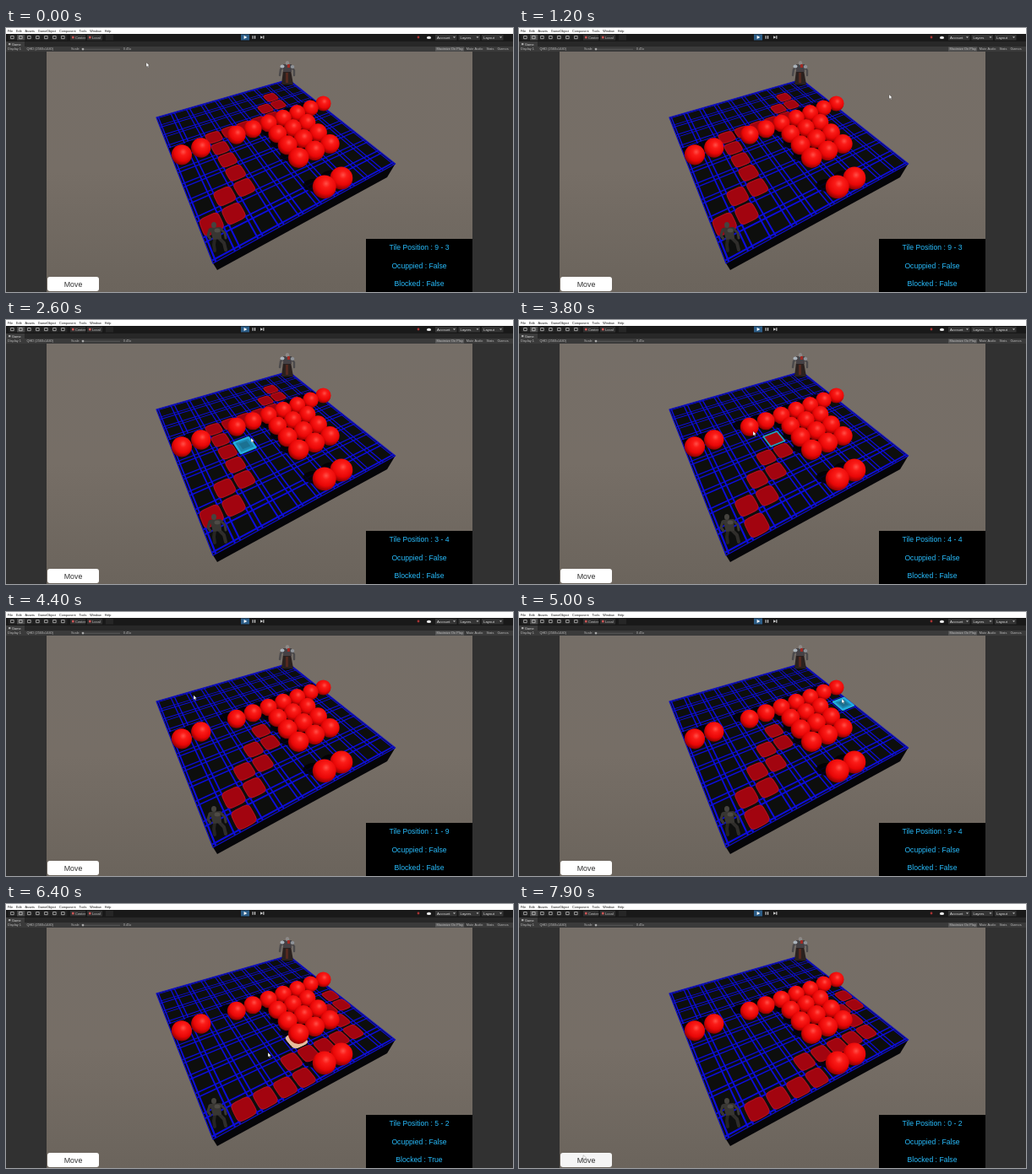
Write an HTML page with a canvas that moves like this. It is 600 by 313 pixels and loops after 8 s.

```html
<!DOCTYPE html>
<html lang="en">
<head>
<meta charset="utf-8">
<title>Grid pathfinding</title>
<style>
html, body { margin: 0; width: 100%; height: 100%; overflow: hidden; background: #313131; }
canvas { display: block; }
</style>
</head>
<body>
<canvas id="stage" width="600" height="313"></canvas>
<script>
const ctx = document.getElementById('stage').getContext('2d');
const FONT = '"Liberation Sans", Arial, sans-serif';
const LOOP = 8000, STEP = 100, SIZE = 10;

// Board cells to screen: a projective map, and its inverse.
const M = { x: 245, y: 279, xu: 40.5, xv: 5.93, yu: -5.18, yv: -9.78, wu: 0.0411, wv: 0.071 };

function project(u, v) {
  const w = 1 + M.wu * u + M.wv * v;
  return [(M.x + M.xu * u + M.xv * v) / w, (M.y + M.yu * u + M.yv * v) / w];
}

function cellAt([x, y]) {
  const a = M.xu - M.wu * x, b = M.xv - M.wv * x, c = M.yu - M.wu * y, d = M.yv - M.wv * y;
  const det = a * d - b * c, dx = x - M.x, dy = y - M.y;
  const cell = [(dx * d - b * dy) / det, (a * dy - dx * c) / det].map(Math.floor);
  return cell.every(n => n >= 0 && n < SIZE) ? cell : null;
}

function isBlocked(x, y) {
  if (y === 0) return x === 5 || x === 6;
  if (y === 5) return x !== 2;
  return y > 1 && y < 5 && x > 4 && x < 8;
}

const spheres = [];
for (let row = SIZE - 1; row >= 0; row--) for (let col = 0; col < SIZE; col++) {
  if (!isBlocked(col, row)) continue;
  const [x, y] = project(col + 0.5, row + 0.5);
  const cy = y * 1.032 - 12.5;
  spheres.push({ x: x + (x - 287) * 0.042, y: cy, r: 4.7 + 0.049 * cy });
}
spheres.sort((a, b) => a.y - b.y);

// Start step and the moves made from cell 0 - 0
const routes = [[0, 'YXYXYYYYXXXXYXY'], [32, 'XYXYXYXY'], [54, 'XXXXYXXXXYYXY']];

// Pointer key points: step, x, y
const keys = [
  [0, 166, 41], [4, 141, 127], [11, 141, 127], [12, 438, 79], [14, 438, 79], [18, 398, 119],
  [22, 398, 119], [25, 287, 145], [26, 290, 140], [31, 300, 140], [37, 300, 140], [38, 277, 132],
  [43, 190, 98], [49, 382, 103], [61, 382, 103], [63, 344, 161], [67, 208, 222], [79, 76, 298]
];

const latest = (list, step) => list.filter(e => e[0] <= step).pop();

function pointer(step) {
  const a = latest(keys, step), b = keys[keys.indexOf(a) + 1] || a;
  const k = (step - a[0]) / (b[0] - a[0] || 1);
  return [a[1] + (b[1] - a[1]) * k, a[2] + (b[2] - a[2]) * k];
}

// The highlight trails the pointer by one step; the last cell stays on the panel.
function hoverAt(step) {
  const lit = step > 0 && cellAt(pointer(step - 1));
  for (let s = step - 1; s >= 0; s--) {
    const cell = cellAt(pointer(s));
    if (cell) return { cell, lit };
  }
  return { cell: [9, 3], lit: false };
}

function routeCells(step) {
  let x = 0, y = 0;
  return [...latest(routes, step)[1]].map(d => d === 'X' ? [++x, y] : [x, ++y]);
}

function rect(x, y, w, h, color) {
  ctx.fillStyle = color;
  ctx.fillRect(x, y, w, h);
}

function poly(points, fill, stroke, width = 1) {
  ctx.beginPath();
  points.forEach(p => ctx.lineTo(...p));
  ctx.closePath();
  if (fill) { ctx.fillStyle = fill; ctx.fill(); }
  if (stroke) { ctx.strokeStyle = stroke; ctx.lineWidth = width; ctx.stroke(); }
}

function limb(points, width, color) {
  ctx.beginPath();
  points.forEach(p => ctx.lineTo(...p));
  ctx.strokeStyle = color;
  ctx.lineWidth = width;
  ctx.stroke();
}

function ellipse(x, y, rx, ry, color) {
  ctx.beginPath();
  ctx.ellipse(x, y, rx, ry, 0, 0, 7);
  ctx.fillStyle = color;
  ctx.fill();
}

function text(s, x, y, size, color, align = 'left') {
  ctx.font = size + 'px ' + FONT;
  ctx.textAlign = align;
  ctx.fillStyle = color;
  ctx.fillText(s, x, y);
  return ctx.measureText(s).width;
}

function flow(words, x, y, size, color, gap) {
  for (const word of words) x += text(word, x, y, size, color) + gap;
}

const quad = (x0, y0, x1, y1) => [project(x0, y0), project(x1, y0), project(x1, y1), project(x0, y1)];

const square = (x, y, inset) => quad(x + inset, y + inset, x + 1 - inset, y + 1 - inset);

function roundSquare(x, y, half) {
  const soft = n => Math.sign(n) * Math.abs(n) ** 0.45 * half + 0.5;
  return Array.from({ length: 40 }, (_, i) => {
    const t = i * Math.PI / 20;
    return project(x + soft(Math.cos(t)), y + soft(Math.sin(t)));
  });
}

function drawEditor() {
  rect(0, 0, 600, 313, '#313131');
  rect(0, 0, 600, 7, '#fff');
  flow(['File', 'Edit', 'Assets', 'GameObject', 'Component', 'Tools', 'Window', 'Help'], 2, 4.6, 3.8, '#111', 3.9);

  rect(0, 7, 600, 9, '#191919');
  for (let x = 3; x < 70; x += 10) {
    rect(x, 8, 9.4, 6.5, x === 13 ? '#4a4a4a' : '#242424');
    ctx.strokeStyle = '#ccc';
    ctx.lineWidth = 0.7;
    ctx.strokeRect(x + 3, 9.5, 3.2, 3.2);
  }
  ['Center', 'Local'].forEach((s, i) => {
    rect(76 + i * 20, 8, 18, 6.5, '#303030');
    rect(78 + i * 20, 9.8, 2.6, 2.6, '#c55');
    text(s, 82 + i * 20, 12.6, 4, '#ccc');
  });
  rect(118, 8, 9, 6.5, '#262626');
  rect(278, 7.5, 10, 7, '#2c5d87');
  poly([[281.6, 9], [285.4, 11], [281.6, 13]], '#fff');
  for (const x of [291.6, 294, 304.3]) rect(x, 9.2, 1.1, 3.6, '#ddd');
  poly([[301.2, 9.2], [304, 11], [301.2, 12.8]], '#ddd');
  ellipse(488, 11, 1.4, 1.4, '#a33');
  ellipse(500.5, 11.4, 2.6, 1.6, '#eee');
  ['Account', 'Layers', 'Layout'].forEach((s, i) => {
    const x = 508 + i * 27.5;
    rect(x, 8, 25.5, 6.5, '#343434');
    text(s, x + 2, 12.7, 4.3, '#ddd');
    poly([[x + 21, 10.2], [x + 24, 10.2], [x + 22.5, 12]], '#bbb');
  });

  rect(0, 16, 600, 6, '#282828');
  rect(0, 16, 22, 6, '#3c3c3c');
  rect(3, 18, 2.4, 2.2, '#aaa');
  text('Game', 7, 20.6, 3.9, '#ddd');
  rect(0, 22, 600, 6, '#3a3a3a');
  rect(508, 22.4, 34, 5.2, '#555');
  flow(['Display 1', 'QHD (2560x1440)'], 2, 26.3, 3.9, '#bbb', 6.5);
  flow(['Scale', '0.45x'], 77, 26.3, 3.9, '#bbb', 52);
  flow(['Maximize On Play', 'Mute Audio', 'Stats', 'Gizmos'], 509.5, 26.3, 3.9, '#bbb', 4);
  rect(90, 24.8, 45, 0.7, '#666');
  ellipse(91, 25.1, 1.4, 1.4, '#aaa');
}

function drawBackdrop() {
  const g = ctx.createLinearGradient(0, 28, 0, 313);
  g.addColorStop(0, '#756e67');
  g.addColorStop(0.5, '#766e66');
  g.addColorStop(1, '#6b645c');
  rect(48, 28, 504, 285, g);
}

function drawBoard() {
  const top = quad(0, 0, SIZE, SIZE);
  poly([top[0], top[1], [451, 177], [250, 287]], '#050508');
  poly(top, '#0d0e0d');
  ctx.save();
  poly(top);
  ctx.clip();
  const half = 0.035;
  for (let k = 0; k <= SIZE; k++) for (const c of [k - 0.11, k + 0.11]) {
    poly(quad(c - half, 0, c + half, SIZE), '#0d0ddc');
    poly(quad(0, c - half, SIZE, c + half), '#0d0ddc');
  }
  spheres.forEach(s => ellipse(s.x - s.r * 0.8, s.y - 2, s.r, s.r * 0.55, 'rgba(2,2,4,.88)'));
  ctx.restore();
  poly(top, null, '#0d0dc8', 1.2);
}

function drawSphere({ x, y, r }) {
  const lx = x + r * 0.15, ly = y - r * 0.28;
  const g = ctx.createRadialGradient(lx, ly, 0, lx, ly, r * 1.35);
  g.addColorStop(0, '#ff5048');
  g.addColorStop(0.25, '#fb1c18');
  g.addColorStop(0.65, '#e80606');
  g.addColorStop(1, '#7c0000');
  ellipse(x, y, r, r, g);
}

function drawStatue() {
  poly([[328, 50], [337, 50], [340, 67], [326, 67]], '#2a211f');
  limb([[329, 46], [325, 49], [324, 56]], 2.4, '#4c4a4c');
  limb([[337, 46], [341, 50], [341, 56]], 2.4, '#4c4a4c');
  rect(328, 43, 10, 9, '#454145');
  ellipse(333, 41.5, 2.2, 2.6, '#8d8988');
  ellipse(327, 45.5, 2.5, 2, '#a9b2ba');
  ellipse(339, 46, 2.3, 2, '#8e9298');
  rect(333, 43, 3, 4, '#a02a24');
  rect(331, 53, 3, 12, '#54291f');
}

function drawPlayer() {
  limb([[247, 250], [246, 257], [247, 264]], 4, '#262523');
  limb([[252, 249], [258, 255], [260, 263]], 4, '#2f2d2b');
  limb([[241, 239], [239, 246], [242, 250]], 3, '#3a3835');
  limb([[254, 238], [259, 243], [260, 249]], 3, '#3a3835');
  poly([[241, 237], [254, 236], [255, 250], [245, 251]], '#383632');
  ellipse(246, 233.5, 3, 3.6, '#45433f');
  ellipse(250, 240, 3.5, 2.5, '#4e4b46');
}

function drawHud([x, y], step) {
  rect(426, 250, 126, 63, '#000');
  [`Tile Position : ${x} - ${y}`, 'Ocuppied : False', `Blocked : ${isBlocked(x, y) ? 'True' : 'False'}`]
    .forEach((s, i) => text(s, 489, 263.3 + 21.2 * i, 8.65, '#28bcfc', 'center'));
  ctx.beginPath();
  ctx.roundRect(49, 295, 61, 17, 3);
  ctx.fillStyle = step >= 77 ? '#f5f5f5' : '#fff';
  ctx.fill();
  text('Move', 79.5, 307, 8.9, '#323232', 'center');
}

function drawPointer([x, y]) {
  const shape = [[0, 0], [0, 5], [1.2, 4], [2.1, 5.8], [2.9, 5.4], [2.1, 3.7], [3.6, 3.5]];
  poly(shape.map(([dx, dy]) => [x + dx, y + dy]), '#fff', 'rgba(40,40,40,.6)', 0.4);
}

function drawHighlight([x, y], onRoute) {
  if (isBlocked(x, y)) poly(roundSquare(x, y, 0.46), '#e6bd9c', '#f0cdb2');
  else if (onRoute) poly(square(x, y, 0.06), null, '#20a4c4', 1.6);
  else {
    poly(square(x, y, 0.06), '#1f86ae', '#22aee0', 2.4);
    poly(square(x, y, 0.27), '#1b7192');
  }
}

function draw(step) {
  const { cell, lit } = hoverAt(step);
  const route = routeCells(step);
  ctx.lineJoin = ctx.lineCap = 'round';
  drawEditor();
  drawBackdrop();
  drawBoard();
  route.forEach(([x, y]) => poly(roundSquare(x, y, 0.42), '#a2040f', '#b20e18', 1.2));
  if (lit) drawHighlight(cell, route.some(c => String(c) === String(cell)));
  drawStatue();
  spheres.forEach(drawSphere);
  drawPlayer();
  drawHud(cell, step);
  drawPointer(pointer(step));
}

function tick() {
  draw(Math.floor(performance.now() % LOOP / STEP));
  requestAnimationFrame(tick);
}
tick();
</script>
</body>
</html>
```
